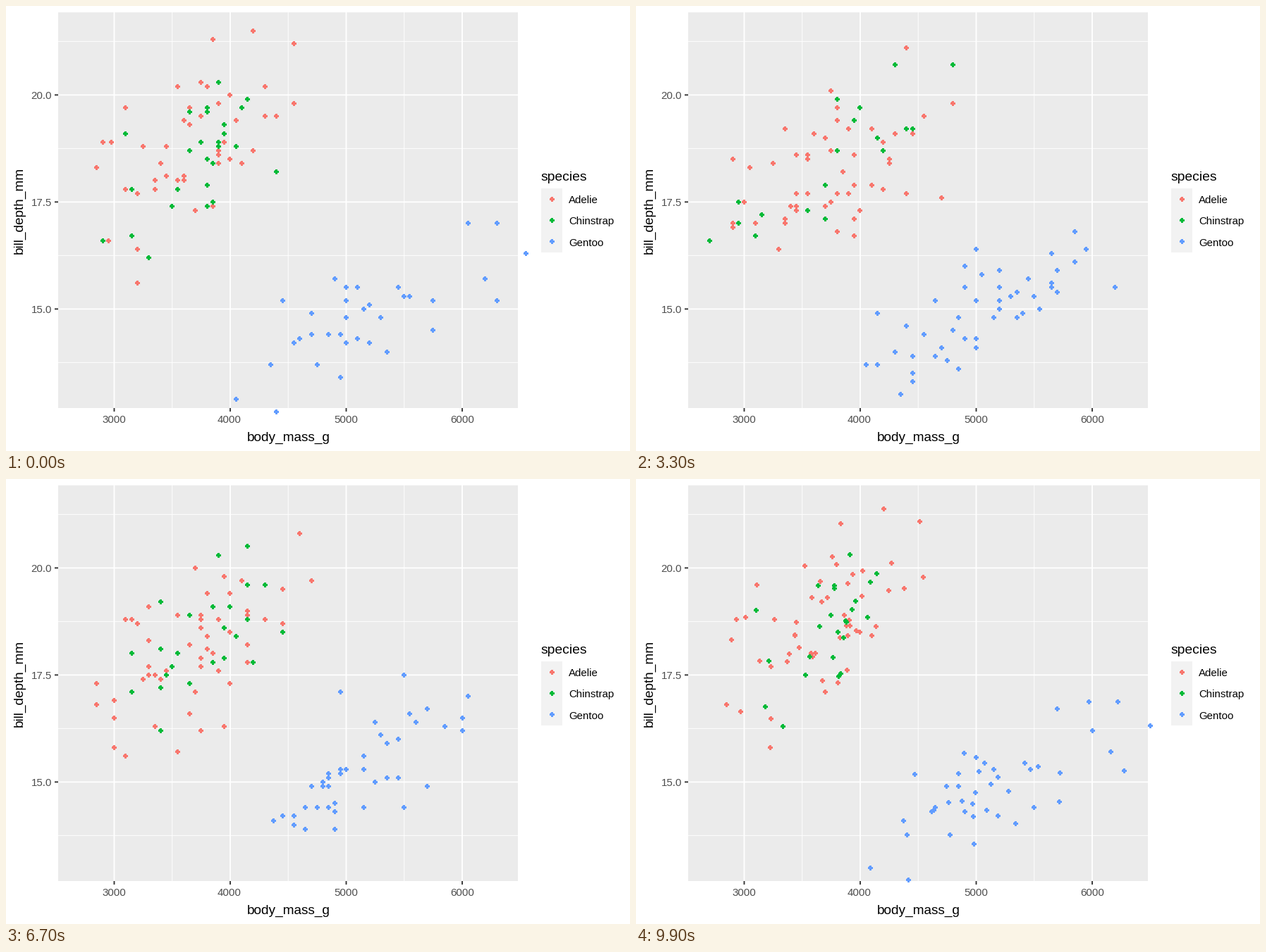
These frames come from a looping animation (885x632 px, 10000 ms). A matplotlib script:

```python
import numpy as np
import matplotlib.pyplot as plt
from matplotlib.animation import FuncAnimation
from matplotlib.patches import Rectangle
from matplotlib.path import Path

W, H, DPI = 885, 632, 72
RED, GREEN, BLUE = "#F8766D", "#00BA38", "#619CFF"

# panel edges in pixels and the data limits they stand for
LEFT, RIGHT, TOP, BOTTOM = 74.5, 726, 9.6, 571.4
MASS = (2520, 6480)
DEPTH = (12.68, 21.92)

rng = np.random.default_rng(7)


def px(mass):
    return LEFT + (mass - MASS[0]) * (RIGHT - LEFT) / (MASS[1] - MASS[0])


def py(depth):
    return TOP + (DEPTH[1] - depth) * (BOTTOM - TOP) / (DEPTH[1] - DEPTH[0])


def scores(n):
    """Random normal scores with mean 0, deviation 1 and short tails."""
    z = np.clip(rng.normal(size=n), -2, 2)
    return (z - z.mean()) / z.std()


def cloud(n, mass, mass_sd, depth, depth_sd, corr, *last):
    """Correlated cloud of n rows on the measuring grid, ending in fixed rows."""
    u, v = scores(n), scores(n)
    m = np.round((mass + mass_sd * u) / 50) * 50
    d = np.round(depth + depth_sd * (corr * u + np.sqrt(1 - corr**2) * v), 1)
    rows = np.column_stack([m, d])
    rows[n - len(last):] = last
    return np.column_stack([px(rows[:, 0]), py(rows[:, 1])])


# three yearly states per species
adelie = [
    cloud(49, 3695, 410, 18.75, 1.15, 0.5, (4200, 21.5), (2975, 18.9)),
    cloud(50, 3740, 455, 18.2, 1.1, 0.6, (4400, 21.1), (4700, 17.6)),
    cloud(52, 3665, 460, 18.1, 1.25, 0.6, (3700, 17.1), (4000, 18.5)),
]
gentoo = [
    cloud(34, 5070, 575, 14.7, 0.9, 0.7, (6300, 15.2), (6050, 17.0)),
    cloud(46, 5020, 510, 14.9, 0.95, 0.75, (4750, 13.8), (5950, 16.4)),
    cloud(43, 5140, 420, 15.3, 0.98, 0.75, (6000, 16.2), (4375, 14.1)),
]
chinstrap = [
    cloud(26, 3695, 310, 18.5, 1.0, 0.55, (2900, 16.6), (4400, 18.2)),
    cloud(18, 3800, 480, 18.4, 1.3, 0.8, (2700, 16.6), (4800, 20.7)),
    cloud(24, 3725, 320, 18.3, 1.1, 0.65, (4450, 18.5), (4300, 19.6)),
]

fig = plt.figure(figsize=(W / DPI, H / DPI), dpi=DPI, facecolor="white")
ax = fig.add_axes([0, 0, 1, 1])
ax.set_xlim(0, W)
ax.set_ylim(H, 0)
ax.axis("off")


def box(x0, y0, x1, y1, color, snap=True):
    ax.add_patch(Rectangle((x0, y0), x1 - x0, y1 - y0, fc=color, lw=0,
                           snap=snap))


def vline(x, y0, y1, width, color="white"):
    box(x - width / 2, y0, x + width / 2, y1, color, snap=False)


def hline(y, x0, x1, width, color="white"):
    box(x0, y - width / 2, x1, y + width / 2, color, snap=False)


def label(x, y, text, size=15, color="black", **kw):
    ax.text(x, y, text, fontsize=size, color=color, family="Liberation Sans",
            va="baseline", **kw)


# crisp seven pixel dot
half = [(1.5, -3.5), (1.5, -2.5), (2.5, -2.5), (2.5, -1.5), (3.5, -1.5),
        (3.5, 1.5), (2.5, 1.5), (2.5, 2.5), (1.5, 2.5), (1.5, 3.5)]
outline = half + [(-x, -y) for x, y in half]
DOT = Path(outline + outline[:1], closed=True)


def on_pixel(xy):
    """Whole pixels, nudged clear of the renderer's rounding edge."""
    return np.floor(xy) + 0.25


def dots(xy, color):
    return ax.scatter(*on_pixel(xy).T, s=49, marker=DOT, color=color,
                      linewidths=0, zorder=3)


# panel with minor and major grid
MINOR, MAJOR = 0.94, 1.87
box(74, 9, 726, 571, "#EBEBEB")
for m in (3500, 4500, 5500):
    vline(px(m), 9, 571, MINOR)
for d in (13.75, 16.25, 18.75, 21.25):
    hline(py(d), 74, 726, MINOR)
for d in (15.0, 17.5, 20.0):
    y = py(d)
    hline(y, 74, 726, MAJOR)
    hline(y, 69, 74, MAJOR, "#333333")
    label(65, int(y) + 6, f"{d:.1f}", color="#4D4D4D", ha="right")
for m in (3000, 4000, 5000, 6000):
    x = px(m)
    vline(x, 9, 571, MAJOR)
    vline(x, 571, 576, MAJOR, "#333333")
    label(int(x), 592, str(m), color="#4D4D4D", ha="center")
label(400.5, 618, "body_mass_g", 19, ha="center")
label(24, 290, "bill_depth_mm", 19, ha="center", rotation=90,
      rotation_mode="anchor")

# legend
label(758, 248, "species", 19.3)
box(759, 259, 789, 350, "#F2F2F2")
for i, (name, color) in enumerate(
        [("Adelie", RED), ("Chinstrap", GREEN), ("Gentoo", BLUE)]):
    y = 274.2 + 30.3 * i
    dots(np.array([[774, y]]), color)
    label(798, round(y + 6), name)

layers = [(years, dots(years[0], color)) for years, color in
          [(adelie, RED), (gentoo, BLUE), (chinstrap, GREEN)]]

# first and last frame of each move to the next year
MOVES = [(11, 33), (45, 67), (79, 100)]


def blend(a, b, t):
    """Rows move pairwise; surplus old rows wait, new rows come at the end."""
    if t >= 1:
        return b
    n = min(len(a), len(b))
    return np.vstack([a[:n] + (b[:n] - a[:n]) * t, a[n:]])


def state(years, frame):
    xy = years[0]
    for k, (start, end) in enumerate(MOVES):
        if frame > start:
            t = (frame - start) / (end - start)
            xy = blend(years[k], years[(k + 1) % 3], t)
    return xy


def update(frame):
    for years, artist in layers:
        artist.set_offsets(on_pixel(state(years, frame)))
    return [artist for _, artist in layers]


anim = FuncAnimation(fig, update, frames=100, interval=100, repeat=True,
                     repeat_delay=0)
plt.show()
```
